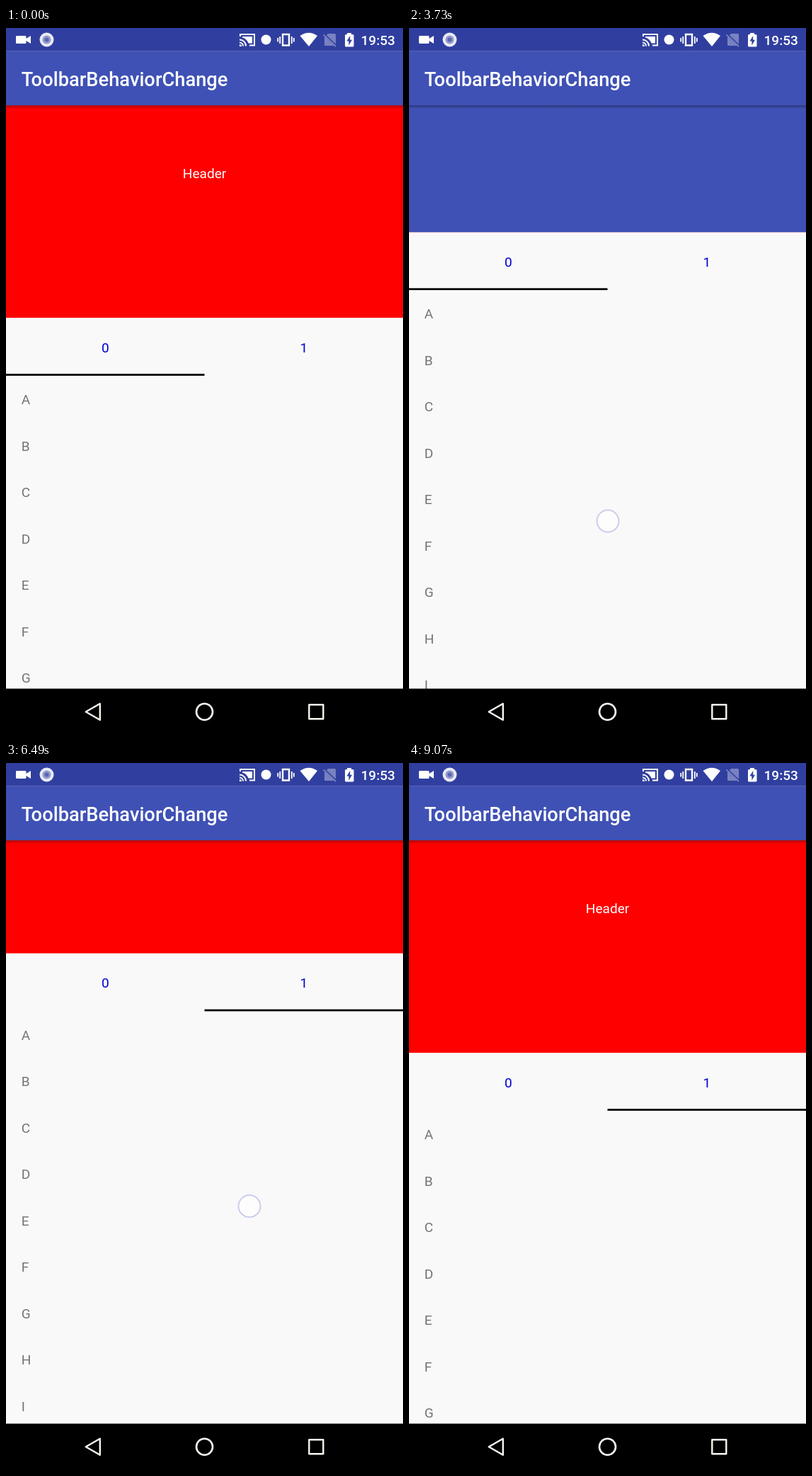
Recreate the animation shown at these times as an HTML page with a canvas. Size 561 px wide and 998 px high, loop 9.11 s.

```html
<!DOCTYPE html>
<html lang="en">
<head>
<meta charset="utf-8">
<title>Toolbar behavior</title>
<style>
  html, body { margin: 0; width: 100%; height: 100%; overflow: hidden; background: #000; }
  canvas { display: block; width: 561px; height: 998px; }
</style>
</head>
<body>
<canvas id="stage" width="561" height="998"></canvas>
<script>
const ctx = document.getElementById('stage').getContext('2d');
const W = 561, H = 998, LOOP = 9110;
const DP = 561 / 411.43;
const STATUS = 24 * DP, BAR_BOTTOM = 80 * DP, NAV_TOP = H - 48 * DP;
const HEADER = 220 * DP, COLLAPSE = 164 * DP, TAB = 60 * DP, ROW = 48 * DP;
const BODY = 14 * DP, TITLE = 20 * DP;
const BLUE = '#3f51b5', DARK_BLUE = '#303f9f', PAPER = '#f9f9f9';
const FADE = 600;

// Drag distance over time; negative values are touch slop.
const firstDrag = [[1110, -16], [1300, -9], [1980, 140.3], [2350, 310], [2750, 400],
  [3050, 390], [3400, 275], [3730, 121.3], [4050, 0], [4300, -10], [4550, -10]];
const secondDrag = [[5920, -16], [6080, -9], [6510, 148], [7030, 362.6], [7350, 430],
  [7600, 410], [8030, 290], [8370, 140], [8620, 0], [8800, -8], [8960, -8]];

const clamp = (v, lo = 0, hi = 1) => Math.min(hi, Math.max(lo, v));
const progress = (t, start, length) => clamp((t - start) / length);
const within = (t, [start], [end]) => t >= start && t < end;

// Smooth curve through key points that never overshoots them.
function follow(keys, t) {
  const last = keys.length - 1;
  if (t <= keys[0][0]) return keys[0][1];
  if (t >= keys[last][0]) return keys[last][1];
  const slope = i => (keys[i + 1][1] - keys[i][1]) / (keys[i + 1][0] - keys[i][0]);
  const tangent = i => {
    if (i === 0 || i === last) return 0;
    const a = slope(i - 1), b = slope(i);
    return a * b > 0 ? 2 * a * b / (a + b) : 0;
  };
  const i = keys.findIndex(k => k[0] > t) - 1;
  const [t0, v0] = keys[i], [t1, v1] = keys[i + 1];
  const d = t1 - t0, u = (t - t0) / d, u2 = u * u, u3 = u2 * u;
  return v0 * (2 * u3 - 3 * u2 + 1) + v1 * (3 * u2 - 2 * u3)
    + d * (tangent(i) * (u3 - 2 * u2 + u) + tangent(i + 1) * (u3 - u2));
}

function scrimAlpha(t) {
  const pulse = (show, hide) => t < hide
    ? progress(t, show, FADE) ** 1.65
    : (1 - progress(t, hide, FADE)) ** 3;
  return t < 5000 ? pulse(1990, 3735) : pulse(6505, 8370);
}

function touchPoint(t) {
  if (within(t, firstDrag[0], firstDrag.at(-1)))
    return [280 + progress(t, 1980, 1750), 817 - follow(firstDrag, t)];
  if (t >= 5030 && t < 5150) return [421, 452];
  if (within(t, secondDrag[0], secondDrag.at(-1))) {
    const base = 766 + 58 * progress(t, 7150, 800);
    return [344 + 4 * progress(t, 7030, 1000), base - follow(secondDrag, t)];
  }
  return null;
}

function rect(x, y, w, h, color) {
  ctx.fillStyle = color;
  ctx.fillRect(x, y, w, h);
}

function text(str, x, y, color, align = 'left', size = BODY, weight = 400) {
  ctx.font = `${weight} ${size}px Roboto, sans-serif`;
  ctx.textAlign = align;
  ctx.fillStyle = color;
  ctx.fillText(str, x, y);
}

function disc(x, y, r, color) {
  ctx.beginPath();
  ctx.arc(x, y, r, 0, 7);
  ctx.fillStyle = color;
  ctx.fill();
}

function fillPath(d, color) {
  ctx.fillStyle = color;
  ctx.fill(new Path2D(d));
}

function strokePath(d, color, width) {
  ctx.strokeStyle = color;
  ctx.lineWidth = width;
  ctx.stroke(new Path2D(d));
}

function shadow(y, depth, alpha) {
  const g = ctx.createLinearGradient(0, y, 0, y + depth);
  g.addColorStop(0, `rgba(0,0,0,${alpha})`);
  g.addColorStop(1, 'rgba(0,0,0,0)');
  rect(0, y, W, depth, g);
}

function drawStatusBar() {
  rect(0, 0, W, STATUS, DARK_BLUE);
  fillPath('M15 11H27Q28.5 11 28.5 12.5V15L35 11V22L28.5 18V20.5Q28.5 22 27 22H15.5Q14 22 14 20.5V12.5Q14 11 15 11Z', '#fff');
  disc(57.5, 16.5, 10, '#e8eaf6');
  disc(57.5, 16.5, 6, '#9299cb');
  disc(57.5, 16.5, 3, '#5a66b0');

  strokePath('M331 12V9H351V24.5H344', '#fff', 2);
  fillPath('M334 12H348V21.5H342.5Q340 15 334 13.5Z', '#fff');
  strokePath('M330 16.5A9 9 0 0 1 339 25.5M330 20.5A5 5 0 0 1 335 25.5', '#fff', 2);
  fillPath('M330 23A3 3 0 0 1 333 26H330Z', '#fff');

  disc(367.5, 16.5, 7, '#fff');

  strokePath('M391 9H400V24.5H391Z', '#fff', 2.4);
  strokePath('M387.2 12V22M403.8 12V22M384.2 14V19.5M406.8 14V19.5', '#fff', 1.8);
  fillPath('M415.5 11Q428 2.5 440 11L428 26Z', '#fff');

  fillPath('M455 8H464.5Q466 8 466 9.5V25H451Q450 25 450 24V13Z', 'rgba(255,255,255,.35)');
  strokePath('M449 9L467 26', DARK_BLUE, 3.5);
  strokePath('M448.5 9.5L466 26', 'rgba(255,255,255,.35)', 1.8);

  fillPath('M482 9V7H488V9H490Q491.5 9 491.5 10.5V25Q491.5 26.5 490 26.5H480.5Q479 26.5 479 25V10.5Q479 9 480.5 9Z', '#fff');
  fillPath('M486.2 11L481.5 18.5H484.4V24.5L489 16.8H486.2Z', DARK_BLUE);
  text('19:53', 501.5, 23.7, '#fff', 'left', BODY, 500);
}

function drawNavigation() {
  rect(0, NAV_TOP, W, H - NAV_TOP, '#000');
  ctx.lineJoin = 'round';
  strokePath('M112.8 965.3L132.8 953.8V976.8Z', '#f8f8f0', 2.4);
  strokePath('M428.3 955.3H448.3V975.3H428.3Z', '#f8f8f0', 2.4);
  strokePath('M269 965.3A11.5 11.5 0 1 1 292 965.3A11.5 11.5 0 1 1 269 965.3Z', '#f8f8f0', 2.6);
  ctx.lineJoin = 'miter';
}

function drawList(x, top, scroll) {
  for (let i = 0; i < 26; i++) {
    const y = top + 122.3 + i * ROW - scroll;
    if (y > top + 60 && y < NAV_TOP + 20)
      text(String.fromCharCode(65 + i), x + 16 * DP, y, '#747474');
  }
}

function draw(t) {
  const dragged = Math.max(0, follow(t < 5000 ? firstDrag : secondDrag, t));
  const offset = Math.min(dragged, COLLAPSE);
  const tabsTop = BAR_BOTTOM + HEADER - offset;
  const page = 1 - (1 - progress(t, 5170, 340)) ** 3;

  rect(0, 0, W, H, PAPER);
  if (page < 1) drawList(-page * W, tabsTop, dragged - offset);
  if (page > 0) drawList((1 - page) * W, tabsTop, dragged - offset);

  rect(0, tabsTop, W, TAB, PAPER);
  text('0', W / 4, tabsTop + 48.7, '#0000d4', 'center');
  text('1', W * 3 / 4, tabsTop + 48.7, '#0000d4', 'center');
  rect(page * W / 2, tabsTop + TAB - 2 * DP, W / 2, 2 * DP, '#000');
  if (offset === COLLAPSE) shadow(tabsTop, 4, .14);

  rect(0, BAR_BOTTOM, W, tabsTop - BAR_BOTTOM, '#f00');
  text('Header', W / 2, 212.2 - offset, '#fff', 'center');
  ctx.globalAlpha = scrimAlpha(t);
  rect(0, BAR_BOTTOM, W, tabsTop - BAR_BOTTOM, BLUE);
  ctx.globalAlpha = 1;
  shadow(BAR_BOTTOM, 5, .32);

  rect(0, STATUS, W, BAR_BOTTOM - STATUS, BLUE);
  text('ToolbarBehaviorChange', 16 * DP, 81.5, '#fff', 'left', TITLE, 500);
  drawStatusBar();
  drawNavigation();

  const touch = touchPoint(t);
  if (touch) {
    disc(...touch, 15.5, 'rgba(255,255,255,.6)');
    ctx.strokeStyle = 'rgba(190,196,232,.8)';
    ctx.lineWidth = 2;
    ctx.stroke();
  }
}

const start = performance.now();
function frame() {
  draw((performance.now() - start) % LOOP);
  requestAnimationFrame(frame);
}
frame();
</script>
</body>
</html>
```
